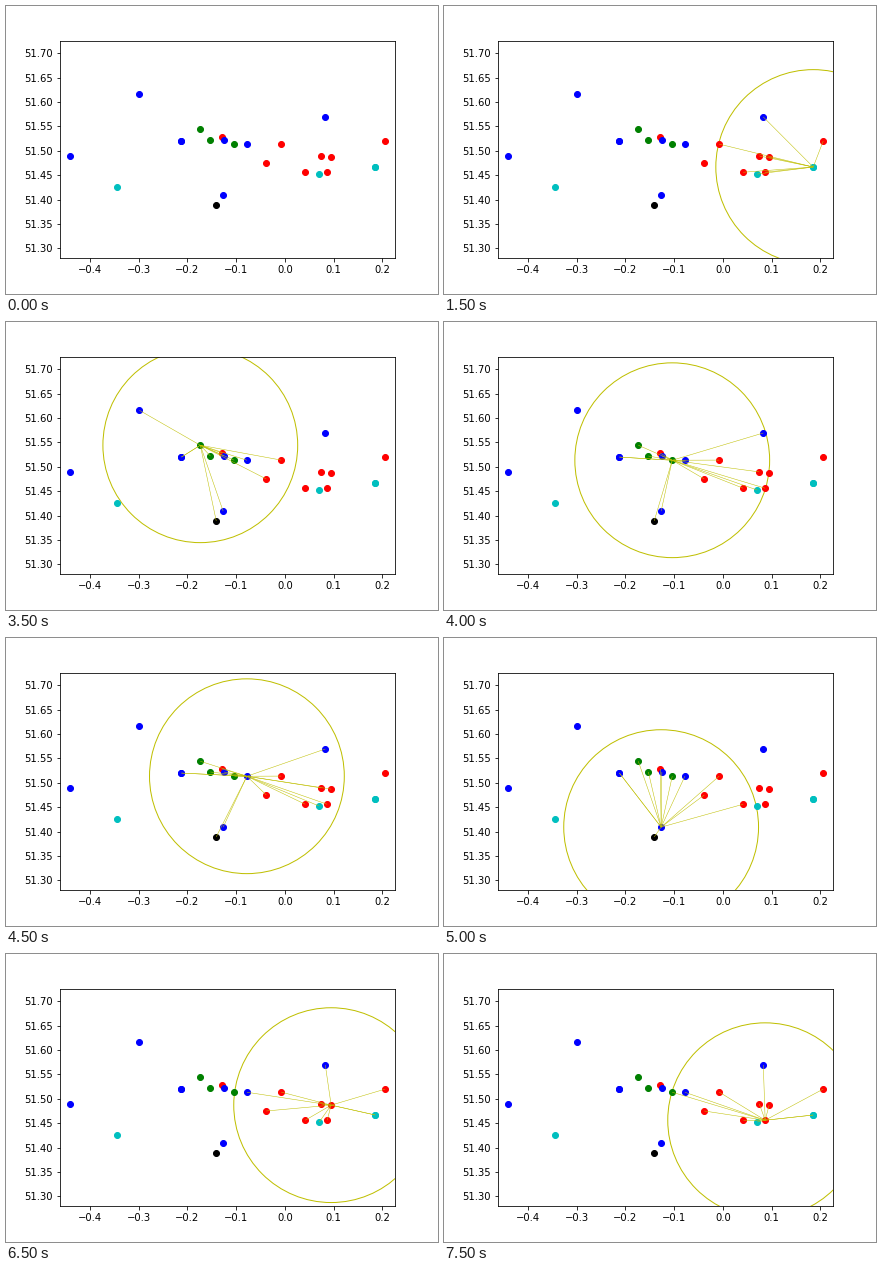
A matplotlib script for the animation above (8000 ms loop, 432 by 288 pixels).

```python
import numpy as np
import matplotlib.pyplot as plt
from matplotlib.animation import FuncAnimation
from matplotlib.collections import LineCollection
from matplotlib.patches import Circle

RADIUS = 0.2
STEP_MS = 500
STEPS = 16

# longitude, latitude, colour; two places hold a pair of stations
STATIONS = [
    (-0.4407, 51.4895, "b"),
    (-0.3440, 51.4250, "c"),
    (-0.2987, 51.6160, "b"),
    (-0.2125, 51.5200, "b"),
    (-0.2125, 51.5200, "b"),
    (-0.1737, 51.5443, "g"),
    (-0.1530, 51.5222, "g"),
    (-0.1286, 51.5283, "r"),
    (-0.1253, 51.5222, "b"),
    (-0.1040, 51.5135, "g"),
    (-0.0780, 51.5135, "b"),
    (-0.1268, 51.4090, "b"),
    (-0.1410, 51.3890, "k"),
    (-0.0076, 51.5138, "r"),
    (-0.0382, 51.4750, "r"),
    (0.0417, 51.4560, "r"),
    (0.0705, 51.4523, "c"),
    (0.0748, 51.4895, "r"),
    (0.0950, 51.4870, "r"),
    (0.0868, 51.4560, "r"),
    (0.1855, 51.4667, "c"),
    (0.1855, 51.4667, "c"),
    (0.0830, 51.5695, "b"),
    (0.2060, 51.5200, "r"),
]
POS = np.array([s[:2] for s in STATIONS])

# station whose neighbourhood is shown at each step
VISITS = [None] * 3 + [20, 21, 8, 7, 5, 9, 10, 11, 17, 15, 18, 16, 19]

fig, ax = plt.subplots(figsize=(6, 4), dpi=72)
fig.subplots_adjust(left=0.125, right=0.9, bottom=0.125, top=0.88)
ax.set_xlim(-0.4618, 0.2257)
ax.set_ylim(51.2799, 51.7264)

for x, y, colour in STATIONS:
    ax.plot(x, y, colour + "o", markersize=6)

ring = ax.add_patch(Circle((0, 0), RADIUS, fill=False, edgecolor="y", linewidth=1))
links = ax.add_collection(
    LineCollection([], colors="y", linewidths=0.5, zorder=2.5), autolim=False
)


def neighbours(i):
    dist = np.hypot(*(POS - POS[i]).T)
    return POS[(dist > 0) & (dist <= RADIUS)]


def draw(step):
    i = VISITS[step]
    ring.set_visible(i is not None)
    if i is None:
        links.set_segments([])
    else:
        ring.center = tuple(POS[i])
        links.set_segments([(POS[i], p) for p in neighbours(i)])
    return ring, links


anim = FuncAnimation(fig, draw, frames=STEPS, interval=STEP_MS, repeat=True, repeat_delay=0)
plt.show()
```
